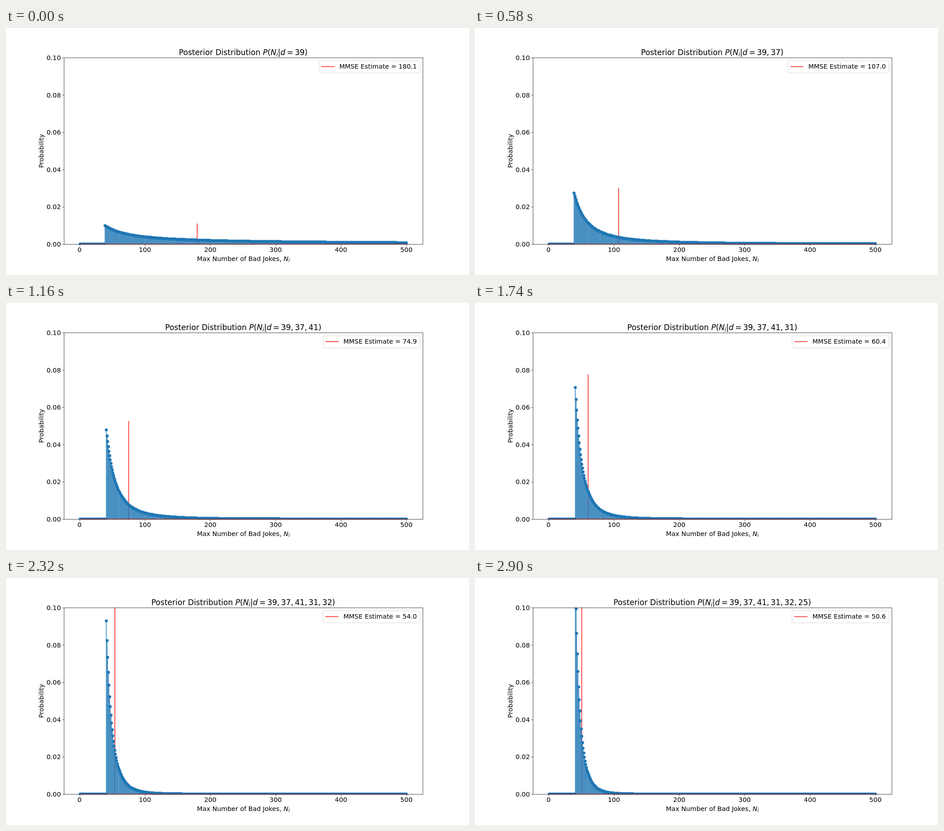
Animation of 1025 by 547 pixels, one loop 3480 ms. Source, as an HTML page:

```html
<!DOCTYPE html>
<html lang="en">
<head>
<meta charset="utf-8">
<title>Posterior distribution</title>
<style>
  html, body { margin: 0; width: 100%; height: 100%; overflow: hidden; background: #fff; }
  svg { display: block; width: 100%; height: 100%; }
  text { font: 15px "DejaVu Sans", sans-serif; white-space: pre; fill: #000; }
  .mid { text-anchor: middle; }
  .end { text-anchor: end; }
  #title { font-size: 18px; }
  .it { font-style: oblique; }
  .sub { font-style: oblique; font-size: 70%; }
  .frame { fill: none; stroke: #000; stroke-opacity: .8; stroke-width: 1; }
  .blue { fill: #1f77b4; fill-opacity: .75; }
  .red { stroke: #f00; stroke-opacity: .75; stroke-width: 2; fill: none; }
</style>
</head>
<body>
<svg viewBox="0 0 1080 576" preserveAspectRatio="none">
  <clipPath id="area"><rect x="135" y="69" width="838" height="436"/></clipPath>
  <g clip-path="url(#area)">
    <path id="mean" class="red"/>
    <path id="stems" class="blue"/>
    <path id="overlaps" class="blue"/>
    <path id="dots" fill="none" stroke="#1f77b4" stroke-width="7" stroke-linecap="round"/>
    <path id="base" fill="none" stroke="#d62728" stroke-opacity=".75" stroke-width="2"/>
  </g>
  <path id="ticks" class="frame"/>
  <rect class="frame" x="135.5" y="69.5" width="837" height="435"/>
  <g id="labels"></g>
  <text id="title" class="mid" x="553.5" y="63.2"></text>
  <text id="xlabel" class="mid" x="553.5" y="543"></text>
  <text class="mid" transform="translate(87.8 286.6) rotate(-90)">Probability</text>
  <rect id="box" y="76.5" height="28" rx="3" fill="#fff" stroke="#ccc" stroke-opacity=".8"/>
  <path id="key" class="red"/>
  <text id="legend" class="end" x="958.5" y="95.2"></text>
</svg>
<script>
const STEP = 580;
const MAX_N = 500;
const data = [39, 37, 41, 31, 32, 25];
const $ = id => document.getElementById(id);
const set = (id, d) => $(id).setAttribute('d', d);

const BASE = 504;
const px = n => 135 + (n - 1 + 24.95) * 837 / 548.9;
const py = p => BASE - p * 4348.8;
const snap = v => Math.floor(v + 0.5);

const italic = s => `<tspan class="it">${s}</tspan>`;
const nSub = drop => italic('N') + `<tspan class="sub" dy="${drop}">i</tspan>`;

function drawAxes() {
  let marks = '', labels = '';
  for (let n = 0; n <= MAX_N; n += 100) {
    marks += `M${snap(px(n)) + 0.5} 505v3.5`;
    labels += `<text class="mid" x="${px(n)}" y="522.8">${n}</text>`;
  }
  for (let k = 0; k <= 5; k++) {
    const y = py(k / 50);
    marks += `M135 ${snap(y) + 0.5}h-3.5`;
    labels += `<text class="end" x="128" y="${y + 5.6}">${(k / 50).toFixed(2)}</text>`;
  }
  set('ticks', marks);
  $('labels').innerHTML = labels;
  $('xlabel').innerHTML = 'Max Number of Bad Jokes, ' + nSub(2.5);
  set('base', `M${px(1) - 0.75} ${BASE}H${px(MAX_N) + 0.75}`);
}

// Uniform prior on N, each observation uniform on 1..N.
function posterior(seen) {
  const low = Math.max(...seen);
  const p = Array.from({ length: MAX_N + 1 }, (_, n) => n < low ? 0 : n ** -seen.length);
  const sum = p.reduce((a, b) => a + b);
  return p.map(v => v / sum);
}

function drawPlot(p) {
  let stems = '', overlaps = '', dots = '', last = -9;
  const bar = (x, y, w) => `M${x} ${BASE}V${y}h${w}V${BASE}z`;
  for (let n = 1; n <= MAX_N; n++) {
    const x = snap(px(n)), y = snap(py(p[n]));
    dots += `M${x} ${y}h0`;
    if (p[n]) {
      stems += bar(x - 1, y, 2);
      if (x - last === 1) overlaps += bar(x - 1, y, 1);
      last = x;
    }
  }
  set('stems', stems);
  set('overlaps', overlaps);
  set('dots', dots);
}

function drawTitle(seen) {
  const gap = 3.5;
  const list = seen.map((d, i) => i ? `,<tspan dx="${gap}">${d}</tspan>` : d).join('');
  $('title').innerHTML = 'Posterior Distribution ' + italic('P') + '(' + nSub(3) +
    `<tspan dy="-3">|</tspan>` + italic('d') +
    `<tspan dx="${gap}">=</tspan><tspan dx="${gap}">${list}</tspan>)`;
}

function drawLegend(mean) {
  const label = $('legend');
  label.textContent = 'MMSE Estimate = ' + mean.toFixed(1);
  const left = 910.5 - label.getComputedTextLength();
  const x = snap(left) + 0.5;
  $('box').setAttribute('x', x);
  $('box').setAttribute('width', 965.5 - x);
  set('key', `M${left + 5.5} 90h31`);
}

function draw(count) {
  const seen = data.slice(0, count);
  const p = posterior(seen);
  const mean = p.reduce((sum, v, n) => sum + v * n, 0);
  drawPlot(p);
  set('mean', `M${snap(px(mean))} ${BASE}V${snap(py(1.1 * Math.max(...p)))}`);
  drawTitle(seen);
  drawLegend(mean);
}

let shown = 0;
const start = performance.now();
function tick() {
  const t = Math.max(0, performance.now() - start);
  const count = Math.floor(t / STEP) % data.length + 1;
  if (count !== shown) draw(shown = count);
  requestAnimationFrame(tick);
}

drawAxes();
tick();
</script>
</body>
</html>
```
